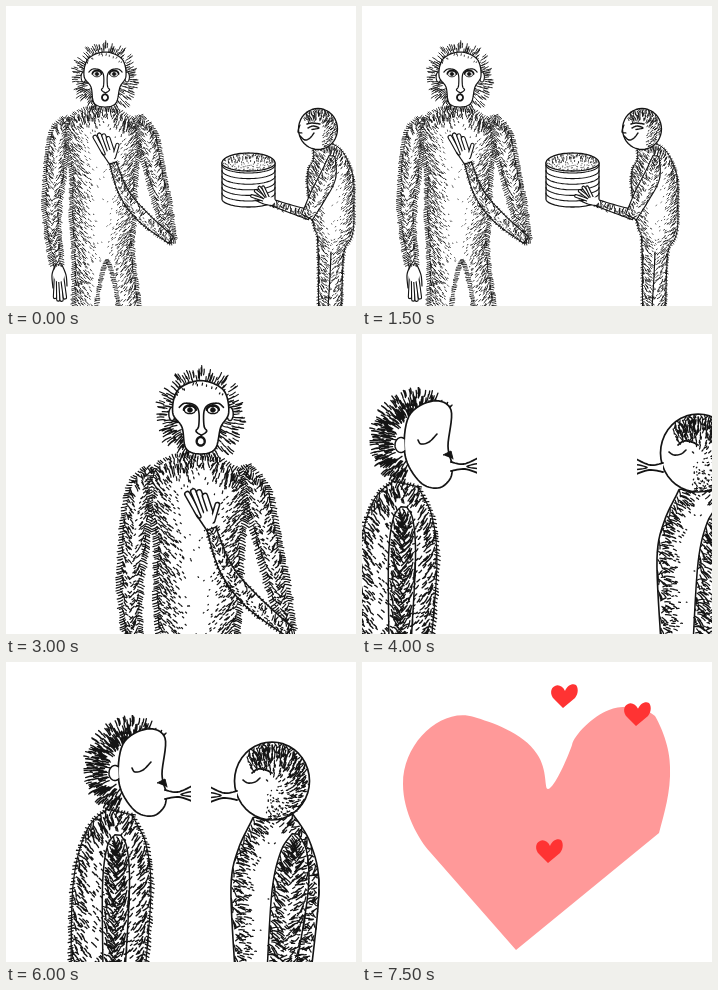
An HTML page with a canvas for the animation above (9 s loop, 350 by 300 pixels).

```html
<!DOCTYPE html>
<html lang="en">
<head>
<meta charset="utf-8">
<title>Cake and a kiss</title>
<style>
html, body { margin: 0; width: 100%; height: 100%; overflow: hidden; background: #fff; }
canvas { display: block; width: 350px; height: 300px; }
</style>
</head>
<body>
<canvas id="stage"></canvas>
<script>
const W = 350, H = 300, LOOP = 9000, BEAT = 500;
const INK = '#141414';
const canvas = document.getElementById('stage');
const ctx = canvas.getContext('2d');
const dpr = window.devicePixelRatio || 1;
canvas.width = W * dpr;
canvas.height = H * dpr;

let seed = 1;
const rnd = () => (seed = seed * 16807 % 2147483647) / 2147483647;
const vary = v => v * (0.65 + 0.7 * rnd());
const clamp = (v, lo, hi) => Math.max(lo, Math.min(hi, v));

// Smooth curve through a flat list of points, each of `dim` values.
function curve(flat, closed = true, dim = 2) {
  const n = flat.length / dim, out = [];
  const at = i => {
    const k = closed ? (i + n) % n : clamp(i, 0, n - 1);
    return flat.slice(dim * k, dim * k + dim);
  };
  for (let i = 0; i < (closed ? n : n - 1); i++) {
    const [a, b, c, d] = [at(i - 1), at(i), at(i + 1), at(i + 2)];
    for (let t = 0; t < 1; t += 0.125) {
      out.push(b.map((v, j) => v + t / 2 * (c[j] - a[j]
        + t * (2 * a[j] - 5 * v + 4 * c[j] - d[j]
        + t * (3 * (v - c[j]) + d[j] - a[j])))));
    }
  }
  out.push(at(closed ? 0 : n - 1));
  return out;
}

// Clockwise outline around a spine of x, y, half width.
function tube(flat) {
  const spine = curve(flat, false, 3), right = [], left = [];
  spine.forEach(([x, y, r], i) => {
    const a = spine[Math.max(0, i - 1)], b = spine[Math.min(spine.length - 1, i + 1)];
    const size = Math.hypot(b[0] - a[0], b[1] - a[1]);
    const nx = r * (b[1] - a[1]) / size, ny = r * (a[0] - b[0]) / size;
    right.push([x + nx, y + ny]);
    left.unshift([x - nx, y - ny]);
  });
  return [...right, ...left, right[0]];
}

function oval(cx, cy, rx, ry, from = 0, to = 2 * Math.PI) {
  return Array.from({ length: 41 }, (_, i) => {
    const a = from + (to - from) * i / 40;
    return [cx + rx * Math.cos(a), cy + ry * Math.sin(a)];
  });
}

function ink(pts, width, fill) {
  ctx.beginPath();
  pts.forEach(p => ctx.lineTo(p[0], p[1]));
  if (fill) { ctx.fillStyle = fill; ctx.fill(); }
  if (width) { ctx.lineWidth = width; ctx.stroke(); }
}
const line = (flat, width = 1.2) => ink(curve(flat, false), width);

function hair(x, y, dx, dy) {
  ctx.moveTo(x, y);
  ctx.quadraticCurveTo(x + dx * 0.5 + dy * 0.1, y + dy * 0.5 - dx * 0.1, x + dx, y + dy);
}

// Short hairs standing off an outline and drooping a little.
function fringe(pts, { gap, len, width = 0.9, droop = 0.35 }) {
  let left = 0;
  ctx.lineWidth = width;
  ctx.beginPath();
  for (let i = 1; i < pts.length; i++) {
    const [ax, ay] = pts[i - 1], dx = pts[i][0] - ax, dy = pts[i][1] - ay;
    const size = Math.hypot(dx, dy) || 1;
    for (; left < size; left += vary(gap)) {
      const l = vary(len), hx = l * dy / size, hy = l * (droop - dx / size), k = left / size;
      hair(ax + dx * k - hx * 0.4, ay + dy * k - hy * 0.4, hx, hy);
    }
    left -= size;
  }
  ctx.stroke();
}

function inside(pts, x, y) {
  let hit = false;
  for (let i = 1; i < pts.length; i++) {
    const [ax, ay] = pts[i - 1], [bx, by] = pts[i];
    if (ay > y !== by > y && x < (bx - ax) * (y - ay) / (by - ay) + ax) hit = !hit;
  }
  return hit;
}

// Hairs grow inward from the outline and shrink to sparse dots further in.
function fur(pts, { gap, len, fade, base = 0.1, across = 0.7, down = 0.7, width = 0.9, keep }) {
  const xs = pts.map(p => p[0]), ys = pts.map(p => p[1]);
  ctx.lineWidth = width;
  ctx.beginPath();
  for (let y = Math.min(...ys); y < Math.max(...ys); y += gap) {
    for (let x = Math.min(...xs); x < Math.max(...xs); x += gap) {
      const px = x + gap * rnd(), py = y + gap * rnd(), chance = rnd();
      if (!inside(pts, px, py) || keep && !keep(px, py)) continue;
      let d = Infinity, nx = 0, ny = 0;
      for (const [ex, ey] of pts) {
        const r = Math.hypot(px - ex, py - ey);
        if (r < d) { d = r; nx = (px - ex) / (r || 1); ny = (py - ey) / (r || 1); }
      }
      const near = Math.max(0, 1 - d / fade);
      if (chance > base + near) continue;
      const l = vary(len) * Math.min(1, 0.1 + base + near);
      hair(px, py, l * across * nx, l * (across * ny + down));
    }
  }
  ctx.stroke();
}

function furry(pts, hairs, edge, outline = 0) {
  ink(pts, outline, '#fff');
  fur(pts, hairs);
  if (edge) fringe(pts, edge);
}

// Radial hairs scattered over a ring.
function mane(cx, cy, rx, ry, count, len, width, from = 0, to = 2 * Math.PI) {
  ctx.lineWidth = width;
  ctx.beginPath();
  for (let i = 0; i < count; i++) {
    const a = from + (to - from) * (i * 0.618 % 1), r = 0.6 + 0.4 * rnd();
    const c = Math.cos(a), s = Math.sin(a), l = vary(len);
    hair(cx + rx * r * c, cy + ry * r * s, -l * c, -l * s);
  }
  ctx.stroke();
}

function finger(x, y, tx, ty, size = 5) {
  [[INK, size], ['#fff', size - 2.2]].forEach(([color, w]) => {
    ctx.strokeStyle = color;
    line([x, y, tx, ty], w);
  });
  ctx.strokeStyle = INK;
}

function sprite(draw, x = 0, y = 0, scale = 1) {
  seed = 4321;
  ctx.save();
  ctx.translate(x, y);
  ctx.scale(scale, scale);
  ctx.strokeStyle = INK;
  ctx.lineCap = ctx.lineJoin = 'round';
  draw();
  ctx.restore();
}

function wildMan() {
  const limb = { gap: 2.3, len: 3.4, fade: 8, base: 0.25 };
  const edge = { gap: 2, len: 4 };
  furry(tube([62,112,3, 54,128,9, 49,165,9, 46,210,7, 51,260,4.5]), limb, edge);
  furry(tube([99,104,16, 98,114,34, 98,135,37, 98,165,32, 97,210,31, 97,245,29, 101,308,33]),
    { gap: 2.3, len: 3.2, fade: 25, base: 0.06 }, edge);
  const gap = curve([101,254, 113,310, 90,310]);
  ink(gap, 0, '#fff');
  fringe(gap, { ...edge, len: -4 });
  furry(tube([132,111,3, 141,130,9, 149,165,8, 157,200,7, 166,235,3]), limb, edge);
  furry(tube([107,157,3.5, 118,187,5, 137,211,6, 165,234,4]),
    { ...limb, len: 2.6, fade: 6 }, { gap: 3, len: 1.6 }, 1.1);

  // Raised hand, then the hanging one
  for (let i = 0; i < 4; i++) finger(98 + 3 * i, 147, 89 + 4.4 * i, 132 - 3 * Math.sin(i + 0.3));
  finger(108, 151, 111.5, 139, 4.4);
  ink(oval(104, 150, 4.5, 6), 0, '#fff');
  line([96,147, 100,153, 104,159]);
  for (let i = 0; i < 4; i++) finger(50 + 2 * i, 270, 49 + 3.3 * i, 291 + 3 * Math.sin(i), 4.4);
  ink(oval(53, 268, 5.5, 8), 0, '#fff');
  line([49,260, 46,269, 47,282]);
  line([56,259, 60,269, 61,280]);

  mane(98.5, 73, 34.5, 40, 230, 6, 0.9);
  [77.5, 121].forEach(x => ink(oval(x, 71, 2.4, 5), 1.1, '#fff'));
  const face = curve([99,46, 116,53, 120,70, 114,81, 110,97, 99,101, 88,97, 85,81, 78,70, 82,53]);
  ink(face, 1.2, '#fff');
  fur(face, { gap: 2.8, len: 1.2, fade: 6, base: 0, keep: (x, y) => y < 58 });
  for (const side of [-1, 1]) {
    const x = 99.5 + 8.6 * side;
    line([x + 8 * side,66, x + 4 * side,63, x - 3 * side,64, 99.5 + 2 * side,69,
      99.5 + 2 * side,80, 99.5 + 4 * side,84, 99.5,87], 1.2);
    ink(oval(x, 68, 4.6, 3.6, Math.PI, 2 * Math.PI), 1.6);
    ink(oval(x, 68, 4.2, 2.8), 1);
    ink(oval(x, 68, 1.8, 1.8), 0.6, INK);
  }
  ink(oval(99, 91.5, 3, 3.2), 1.8, '#fff');
}

function giver() {
  furry(tube([313,140,7, 321,152,17, 324,172,23, 326,200,22, 328,225,19, 325,246,13, 324,308,11.5]),
    { gap: 2.2, len: 3.2, fade: 15, base: 0.1 }, { gap: 2.6, len: 2 }, 1);
  line([325,246, 324,270, 322,302]);

  // Cake
  const rim = y => oval(242.5, y, 26.5, 8, Math.PI, 0);
  ink([[216, 157], ...rim(193), [269, 157]], 1.3, '#fff');
  for (let i = 0; i < 6; i++) ink(rim(159 + i * 5.6), 1.1);
  const top = [...rim(157), ...oval(242.5, 157, 26.5, 10, 0, -Math.PI)];
  ink(top, 1.3, '#fff');
  fur(top, { gap: 2.2, len: 1, fade: 10, base: 0.4 });

  // Arm and hand
  const arm = { gap: 2.2, len: 3, fade: 7, base: 0.25 };
  furry(tube([304,209,5, 285,203,4, 262,195,3]), arm, null, 1.1);
  furry(tube([326,150,3, 322,170,8, 312,190,8, 301,211,6]), arm, null, 1.1);
  for (let i = 0; i < 4; i++) finger(264, 196, 246 + 3.7 * i, 190 - 9 * Math.sin(i * 0.6), 3.8);
  ink(oval(263, 195, 6, 4), 0, '#fff');
  line([249,194, 258,198, 268,200]);

  // Head
  const head = oval(312, 123, 19.5, 20.5);
  ink(head, 1.3, '#fff');
  fur(head, { gap: 2, len: 2.6, fade: 15, base: 0.25, keep: (x, y) => x > 317 || y < 113 });
  line([301,118, 306,117, 314,118], 1.5);
  line([302,122, 307,120, 313,122, 306,123.5], 1.4);
  line([294,119, 292,126, 296,127]);
  line([294,130, 299,134, 304,132, 308,127], 1.4);
}

function lips() {
  ctx.save();
  ctx.beginPath();
  ctx.rect(0, 0, 185, H);
  ctx.clip();
  const top = curve([159,128, 172,130, 188,123], false);
  const bottom = curve([188,140, 173,135, 159,137], false);
  ink([...top, ...bottom], 0, '#fff');
  ink(top, 1.8);
  ink(bottom, 1.8);
  line([188,129, 175,132.5, 188,135], 1.5);
  ctx.restore();
}

function kisserLeft() {
  const coat = { gap: 3.6, len: 6, fade: 14, base: 0.4, width: 1.35 };
  furry(tube([114,150,13, 109,175,30, 106,225,39, 102,310,37]), coat, { gap: 3.4, len: 4, width: 1.3 }, 1.2);
  furry(tube([112,173,3, 111,186,10, 110,225,13.5, 108,310,11]), { ...coat, gap: 3.3, base: 0.6 }, null, 1.5);

  mane(125, 107, 49, 54, 270, 7.5, 1.35, -0.75, -4.4);
  ink(curve([117,82, 141,67, 159,76, 156,112, 160,131, 158,145, 146,154, 128,148, 113,121]), 1.7, '#fff');
  const ear = oval(109, 111, 6, 7.5, 0.9, 5.3);
  ink(ear, 1.5, '#fff');
  line([126,106, 129,110, 137,108, 145,100], 1.6);
  ink([[151, 121], [159, 117], [161, 125]], 1, INK);
  lips();
}

function kisserRight() {
  const coat = { gap: 3, len: 6, fade: 24, base: 0.03, across: 1, down: 0.25, width: 1.25 };
  furry(tube([267,154,20, 269,184,36, 269,225,44, 267,310,38]), coat, null, 1.6);
  furry(tube([289,172,3, 288,190,13, 284,230,18, 275,310,14]),
    { ...coat, len: 5.5, fade: 16, base: 0.3, down: 0.7 }, null, 1.5);

  const head = oval(266, 119, 37.5, 39);
  ink(head, 1.7, '#fff');
  fur(head, { ...coat, gap: 2.7, len: 4.5, fade: 34, base: 0.12, across: 0.8, down: 0.6,
    keep: (x, y) => x > 260 || y < 106 && x > 241 });
  line([237,118, 242,121, 249,120, 254,116], 1.6);
  line([246,111, 252,107, 260,108, 266,111], 1.8);
  ctx.translate(390, 1);
  ctx.scale(-1, 1);
  lips();
}

const bigHeart = new Path2D('M186 127C182 127 186 108 175 92C161 70 128 60 112 55C80 45 41 80 41 122' +
  'C41 150 57 178 68 190L154 288L297 171C302 152 309 130 308 105C308 85 299 64 293 54' +
  'C280 43 260 43 247 48C231 54 212 73 210 83C206 95 192 127 186 127Z');
const smallHeart = new Path2D('M14 7C12 2 7 0 4 2C-1 4 -1 11 3 15L12 24L24 14C28 9 27 3 25 1C21-1 16 2 14 7Z');

function heart(x, y) {
  ctx.save();
  ctx.translate(x, y);
  ctx.fillStyle = '#ff3333';
  ctx.fill(smallHeart);
  ctx.restore();
}

function offer(beat) {
  sprite(wildMan, -Math.min(beat, 1));
  sprite(giver, [0, -12, -22, -32, -48, -41][beat]);
}

function kiss(beat) {
  const shift = clamp(20 * (beat - 12), -70, 10);
  sprite(kisserLeft, shift);
  sprite(kisserRight, -shift);
  if (beat >= 13) heart(182, 30);
  if (beat >= 14) heart(239, 31);
}

function love() {
  ctx.fillStyle = '#ff9999';
  ctx.fill(bigHeart);
  heart(189, 22);
  heart(262, 40);
  heart(174, 177);
}

function draw(beat) {
  ctx.setTransform(dpr, 0, 0, dpr, 0, 0);
  ctx.fillStyle = '#fff';
  ctx.fillRect(0, 0, W, H);
  if (beat < 6) offer(beat);
  else if (beat < 8) sprite(wildMan, 62.7, -14.7, 4 / 3);
  else if (beat < 15) kiss(beat);
  else love();
}

const start = performance.now();
let shown = -1;
function tick() {
  const beat = Math.floor((performance.now() - start) % LOOP / BEAT);
  if (beat !== shown) draw(shown = beat);
  requestAnimationFrame(tick);
}
tick();
</script>
</body>
</html>
```
